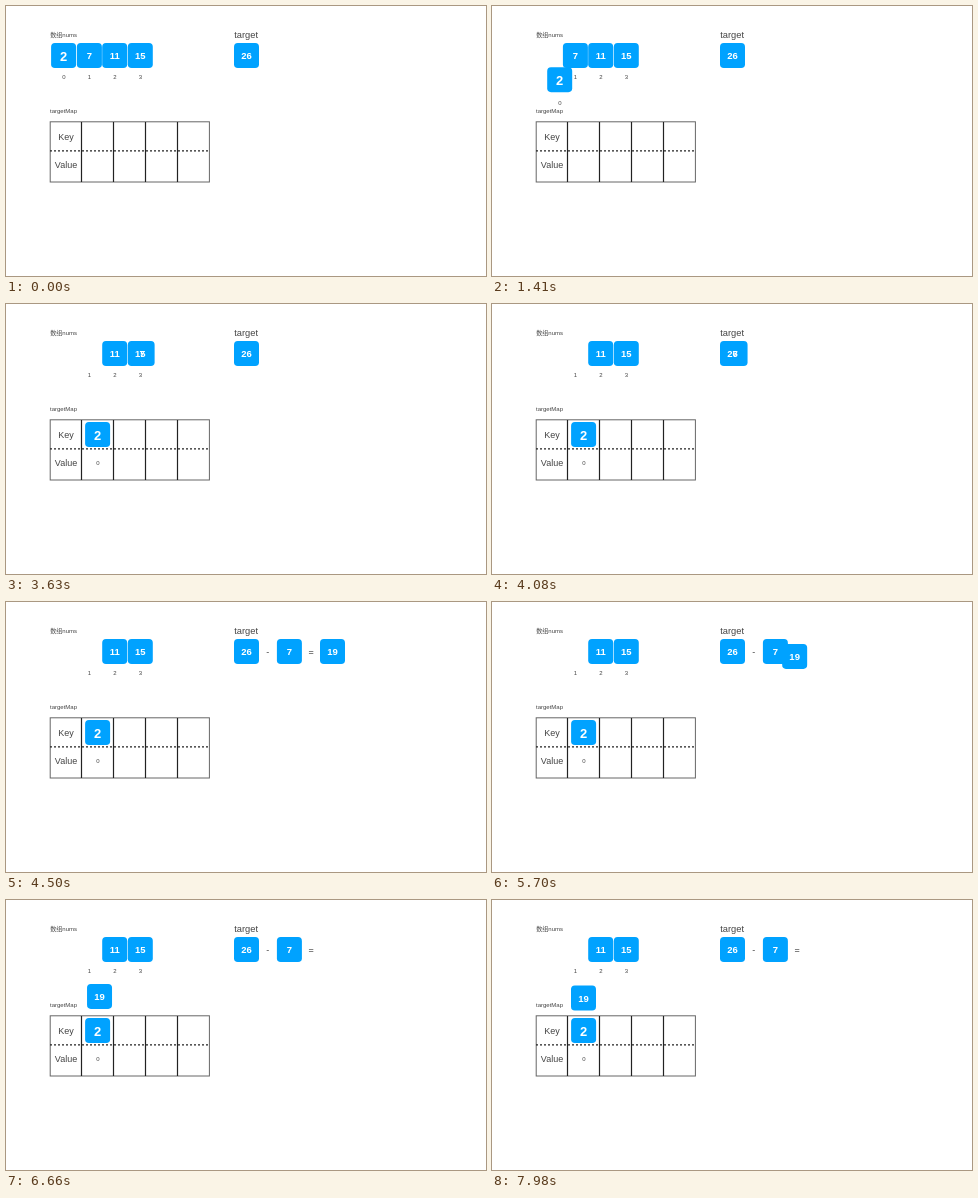
Write an HTML page that moves like this. It is 480 px wide and 270 px high and loops after 8000 ms.

```html
<!DOCTYPE html>
<html lang="zh">
<head>
<meta charset="utf-8">
<title>Two Sum</title>
<style>
  html, body { margin: 0; width: 100%; height: 100%; overflow: hidden; background: #fff; }
  svg { display: block; width: 100%; height: 100%; }
  text { font-family: "Liberation Sans", "Noto Sans CJK SC", "Noto Sans CJK", Arial, sans-serif; fill: #444; }
  .small { font-size: 6px; }
  .label { font-size: 9px; }
  .mid { text-anchor: middle; }
  .digit { font-weight: bold; fill: #fff; text-anchor: middle; }
</style>
</head>
<body>
<svg viewBox="0 0 480 270">
  <text class="small" x="44.3" y="30.6">数组nums</text>
  <text class="small" x="44" y="107">targetMap</text>
  <text x="228.2" y="32" font-size="9.3">target</text>
  <g fill="none" stroke="#222">
    <rect x="44.2" y="115.8" width="159.2" height="60.2" stroke="#666"/>
    <path d="M75.5 116v60M107.5 116v60M139.5 116v60M171.5 116v60" stroke-width="1.2"/>
    <path d="M44 144.9H203.5" stroke-width="1.2" stroke-dasharray="2 2"/>
  </g>
  <text class="label mid" x="60" y="133.8">Key</text>
  <text class="label mid" x="60" y="162">Value</text>
  <g id="indices"></g>
  <g id="signs">
    <text class="label mid" x="261.8" y="53">-</text>
    <text class="label mid" x="305.2" y="53">=</text>
  </g>
  <g id="tiles"></g>
  <g id="digits"></g>
</svg>
<script>
const LOOP = 8000, STEP = 30, MOVE = 1350, SIZE = 25;
const $ = id => document.getElementById(id);

function add(parent, tag, attrs, content = '') {
  const node = document.createElementNS('http://www.w3.org/2000/svg', tag);
  for (const name in attrs) node.setAttribute(name, attrs[name]);
  node.textContent = content;
  parent.append(node);
  return node;
}

// All digits lie in a layer above all squares.
function tile(value, x, fontSize = 9.5) {
  return [
    add($('tiles'), 'rect', { x, y: 37.1, width: SIZE, height: SIZE, rx: 3.8, fill: '#00a2ff' }),
    add($('digits'), 'text', {
      class: 'digit', x: x + SIZE / 2, y: 49.9 + fontSize * 0.36, 'font-size': fontSize
    }, value)
  ];
}

tile(11, 96.2);
tile(15, 121.8);
tile(26, 228);
const seven = tile(7, 70.9);
const two = tile(2, 45.1, 13);
const nineteen = tile(19, 314);
const [zero] = [0, 1, 2, 3].map(i =>
  add($('indices'), 'text', { class: 'small mid', x: 57.8 + 25.5 * i, y: 73.2 }, i));

// Cubic Bézier ease-in-out (.42, 0, .58, 1), solved by bisection.
function ease(u) {
  if (u <= 0) return 0;
  if (u >= 1) return 1;
  let low = 0, high = 1, s;
  for (let i = 0; i < 24; i++) {
    s = (low + high) / 2;
    const x = 1.26 * s * (1 - s) ** 2 + 1.74 * s * s * (1 - s) + s ** 3;
    if (x < u) low = s; else high = s;
  }
  return s * s * (3 - 2 * s);
}

function shift(nodes, dx, dy) {
  for (const node of nodes) node.setAttribute('transform', `translate(${dx} ${dy})`);
}

function show(nodes, visible) {
  for (const node of nodes) node.setAttribute('visibility', visible ? 'visible' : 'hidden');
}

function draw(now) {
  const t = Math.floor((now % LOOP) / STEP) * STEP;
  const progress = start => ease((t - start) / MOVE);

  const store = progress(900);
  shift(two, 34 * store, 81 * store);
  shift([zero], 34 * store, 88 * store);

  shift(seven, 200 * progress(3150), 0);
  show([$('signs'), ...nineteen], t >= 4500);

  const lookUp = progress(5400);
  shift(nineteen, -235 * lookUp, 47.2 * lookUp + 10 * progress(7650));
}

function frame() {
  draw(performance.now());
  requestAnimationFrame(frame);
}
frame();
</script>
</body>
</html>
```
